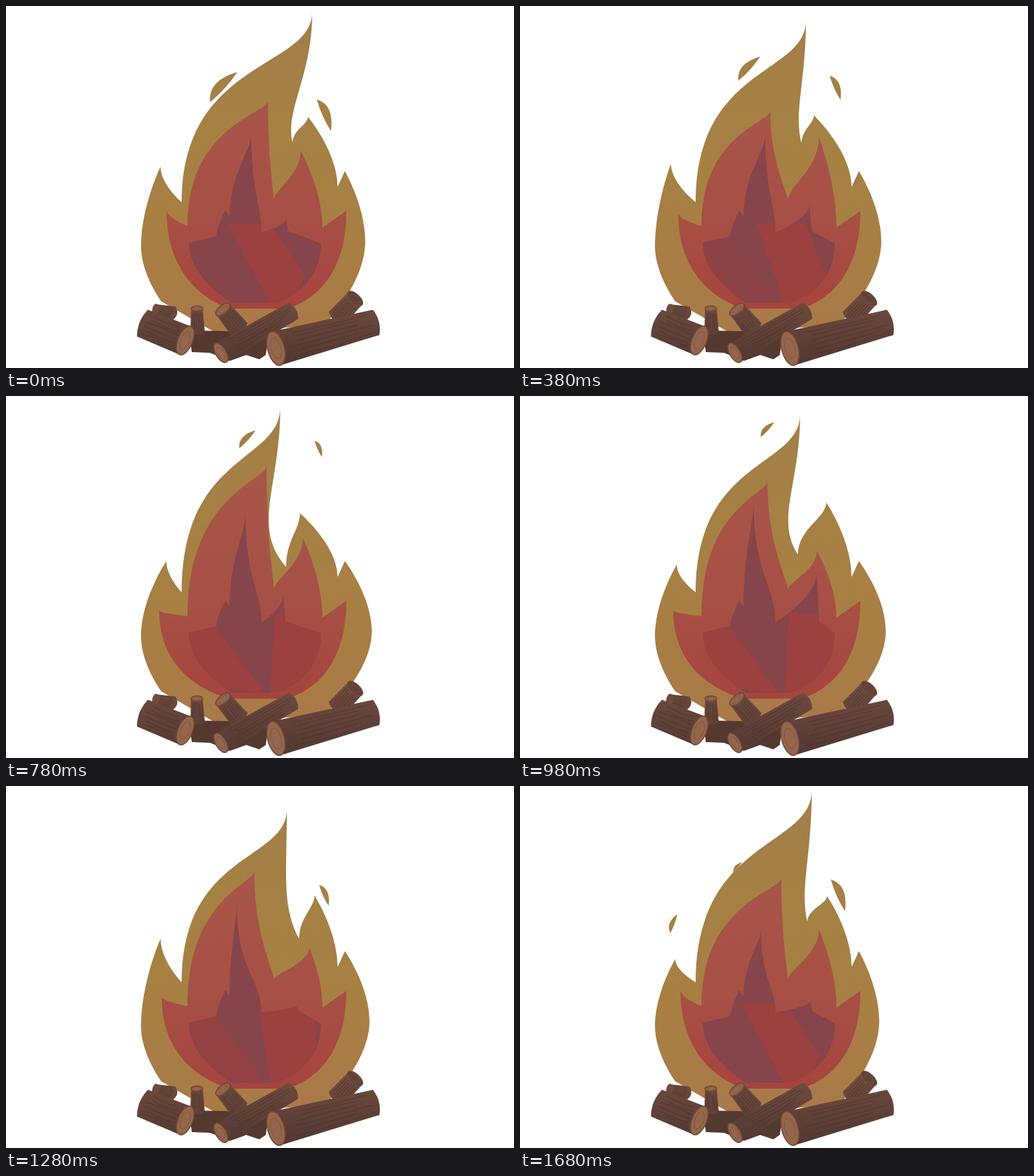
An HTML page for the animation above (1780 ms loop, 700 px wide and 500 px high).

```html
<!DOCTYPE html>
<html lang="en">
<head>
<meta charset="utf-8">
<title>Campfire</title>
<style>
html, body { margin: 0; width: 100%; height: 100%; overflow: hidden; background: #fff; }
svg { display: block; width: 700px; height: 500px; }
.bark { fill: none; stroke: #49312b; stroke-width: 1.2; opacity: .5; }
</style>
</head>
<body>
<svg viewBox="0 0 700 500">
  <defs>
    <linearGradient id="gold" gradientUnits="userSpaceOnUse" x1="0" y1="10" x2="0" y2="440">
      <stop offset="0" stop-color="#a37d4a"/><stop offset=".35" stop-color="#a58143"/>
      <stop offset=".7" stop-color="#a87f43"/><stop offset="1" stop-color="#a97a48"/>
    </linearGradient>
    <linearGradient id="red" gradientUnits="userSpaceOnUse" x1="0" y1="100" x2="0" y2="420">
      <stop offset="0" stop-color="#a8564a"/><stop offset=".6" stop-color="#a75045"/>
      <stop offset="1" stop-color="#a6443c"/>
    </linearGradient>
    <linearGradient id="wood" gradientUnits="userSpaceOnUse" x1="0" y1="395" x2="0" y2="497">
      <stop offset="0" stop-color="#71503e"/><stop offset=".4" stop-color="#65443a"/>
      <stop offset="1" stop-color="#503831"/>
    </linearGradient>
    <clipPath id="inside"><path id="coreClip"/></clipPath>
  </defs>
  <g fill="url(#gold)"><path id="outer"/><path id="sparks"/></g>
  <path id="mid" fill="url(#red)"/>
  <path id="core" fill="#85454a"/>
  <g clip-path="url(#inside)" fill="#9b4140"><path id="band"/><path id="ember" d="M225 315H286L358 412 275 400Z"/></g>
  <path d="M252 448L300 449 362 452 358 482 349 488 331 482 309 490 281 479 256 478Z" fill="#54392f"/>
  <g id="logs"></g>
</svg>
<script>
const LOOP = 1780;
const el = id => document.getElementById(id);
const lerp = (a, b, k) => a + (b - a) * k;

// Places of the dancing tips at the key times
const keys = [0, 380, 780, 980, 1280, 1480, 1680];
const track = s => s.split(' ').map(p => p.split(',').map(Number));
const tips = {
  left: track('213,222 208,218 221,228 216,233 213,211 213,239 214,239'),
  top: track('422,8 394,20 378,15 386,25 387,32 376,8 402,6'),
  gap: track('395,189 388,190 386,236 383,219 404,211 397,198 396,188'),
  peak: track('416,153 405,151 405,162 422,147 425,151 423,152 423,152'),
  midTop: track('361,131 345,145 359,96 341,117 342,117 347,85 360,127'),
  midPeak: track('406,200 412,181 409,196 409,214 418,223 402,230 412,198'),
  spike: track('338,177 338,178 330,163 322,145 318,163 322,193 332,198'),
  coreTip: track('386,294 399,274 382,275 409,243 400,303 405,297 400,297')
};

function pose(t) {
  const i = keys.findLastIndex(k => k <= t), j = (i + 1) % keys.length;
  const k = (t - keys[i]) / ((keys[j] || LOOP) - keys[i]);
  const now = {};
  for (const id in tips) now[id] = tips[id][i].map((v, c) => lerp(v, tips[id][j][c], k));
  return now;
}

// Each step is [point, u, v, pull]: the edge leaves and arrives upright,
// u and v say for how long, pull drags its end to the left
function outline(from, ...steps) {
  let [ax, ay] = from, d = `M${ax} ${ay}`;
  for (const [[bx, by], u = 0, v = 0, pull = 0] of steps) {
    const h = by - ay;
    d += `C${ax} ${ay + u * h} ${bx - pull} ${by - v * h} ${bx} ${by}`;
    [ax, ay] = [bx, by];
  }
  return d + 'Z';
}

// Sparks hang until u = 0, then drift and shrink
const sparks = [
  { born: -150, dies: 1080, x: 300, y: 112, vx: .042, vy: -.067, size: 56, turn: -48 },
  { born: -600, dies: 880, x: 438, y: 151, vx: -.01, vy: -.1, size: 48, turn: 66 },
  { born: -380, dies: 0, x: 212, y: 190, vx: 0, vy: 0, size: 28, turn: -70 },
  { born: -380, dies: -200, x: 345, y: 42, vx: 0, vy: 0, size: 19, turn: -85 }
];

function spark(s, t) {
  const u = t < s.dies ? t : t - LOOP;
  if (u < s.born || u >= s.dies) return '';
  const rise = Math.max(0, u);
  const grown = Math.min(1, (u - s.born) / 150);
  const h = s.size / 2 * grown * (1 - .55 * rise / Math.max(1, s.dies));
  const a = s.turn * Math.PI / 180, cos = Math.cos(a), sin = Math.sin(a);
  const at = (x, y) => [s.x + s.vx * rise + h * (x * cos - y * sin), s.y + s.vy * rise + h * (x * sin + y * cos)];
  return `M${at(-1, 0)}Q${at(-.3, -.8)} ${at(1, 0)}Q${at(0, .15)} ${at(-1, 0)}Z`;
}

function draw(t) {
  const p = pose(t);
  const swell = Math.min(1, Math.max(0, .5 - .8 * Math.cos(2 * Math.PI * t / LOOP)));
  const bend = (p.gap[1] - 170) / 300 * (p.gap[1] - p.top[1]);
  const put = (id, d) => el(id).setAttribute('d', d);

  put('outer', outline([214, 408],
    [[186, 332], 0, .5], [p.left, .5, 0], [[242, 271], .5, 0],
    [p.top, .75, .3], [p.gap, .5, .25, bend],
    [p.peak, .5, .3], [[457, 250], 0, .5],
    [[467, 228]], [[495 + 9 * swell, 325], 0, .5],
    [[440, 440], .5, 0], [[290, 452]]));

  put('mid', outline([310, 418],
    [[221 - 10 * swell, 281 + 15 * swell], 0, .85], [[250, 304], .5, 0],
    [p.midTop, .8, .1], [[369, 268], .6, .1],
    [p.midPeak, .2, .5], [[436, 306], 0, .5],
    [[469, 283]], [[385, 418], .9, 0]));

  const core = outline([312, 410],
    [[252, 327], 0, .6], [[290, 318]], [[302, 282], .3, 0], [[308, 291]],
    [p.spike, .5, .2], [[352, 313], .6, .3],
    [p.coreTip, 0, .5], [[p.coreTip[0] + 3, 311]],
    [[434, 328]], [[372, 410], .8, 0]);
  put('core', core);
  put('coreClip', core);

  const edge = 305 + 65 * swell;
  put('band', `M${edge} 300H${edge + 60 + 25 * swell}L${lerp(412, 440, swell)} 372 400 400 364 412Z`);
  el('ember').style.opacity = swell;
  put('sparks', sparks.map(s => spark(s, t)).join(''));
}

let seed = 7;
const random = () => (seed = seed * 16807 % 2147483647) / 2147483647;

// A log from its cut face (x, y, r) to its far end (x2, y2, r2)
function log(x, y, r, x2, y2, r2, face = '#94664b') {
  const len = Math.hypot(x2 - x, y2 - y), dx = (x2 - x) / len, dy = (y2 - y) / len;
  const at = (along, side) => {
    const w = lerp(r, r2, along) * side;
    return [lerp(x, x2, along) - dy * w, lerp(y, y2, along) + dx * w];
  };
  let bark = '';
  for (let side = -.7; side < .8; side += .28) {
    const mid = at(.5, side + (random() - .5) * .4);
    bark += `M${at(.15 + .1 * random(), side)}Q${mid} ${at(.8 + .18 * random(), side)}`;
  }
  const ring = (k, style) => `<ellipse rx="${.48 * r * k}" ry="${r * k}" ${style}
    transform="translate(${x} ${y}) rotate(${Math.atan2(dy, dx) * 180 / Math.PI})"/>`;
  return `<path fill="url(#wood)" d="M${at(0, -1)}L${at(1, -1)}Q${at(1 + 8 / len, 0)} ${at(1, 1)}L${at(0, 1)}Z"/>
    <path class="bark" d="${bark}"/>` +
    ring(1, `fill="${face}" stroke="#70493a" stroke-width="1.5"`) +
    ring(.6, 'fill="none" stroke="#7d533f" opacity=".7"');
}

el('logs').innerHTML =
  log(206, 420, 8, 232, 424, 9, '#6b4a3b') +
  log(481, 404, 13, 455, 432, 14, '#5f4137') +
  log(263, 418, 8, 264, 450, 10) +
  log(299, 419, 12, 322, 447, 14) +
  log(247, 462, 21, 188, 438, 20) +
  log(296, 479, 15, 396, 421, 13) +
  log(372, 473, 24, 510, 437, 18);

// The picture jumps ten times a second, with one short step before 280 ms
const snap = t => t < 280 ? Math.floor(t / 100) * 100 : 280 + Math.floor((t - 280) / 100) * 100;
const start = performance.now();
let shown = -1;
function tick() {
  const t = snap((performance.now() - start) % LOOP);
  if (t !== shown) draw(shown = t);
  requestAnimationFrame(tick);
}
tick();
</script>
</body>
</html>
```
